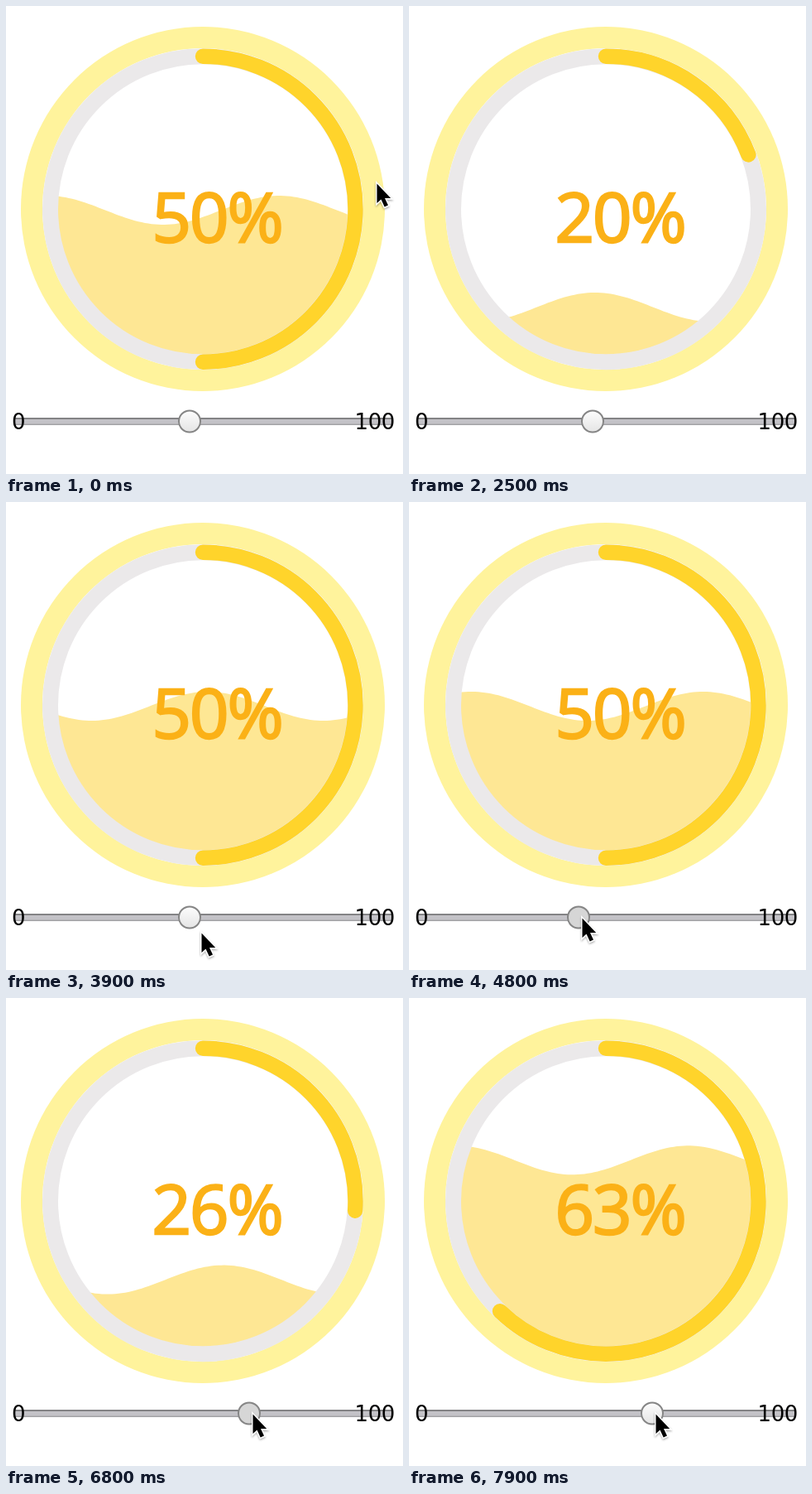
Recreate the animation shown at these times as an HTML page. Size 480 by 565 pixels, loop 8000 ms.

```html
<!DOCTYPE html>
<html lang="en">
<head>
<meta charset="utf-8">
<title>Liquid progress gauge</title>
<style>
  html, body { margin: 0; width: 100%; height: 100%; overflow: hidden; background: #fff; }
  svg { display: block; width: 480px; height: 565px; }
  .value {
    font: 83px "Open Sans", "Noto Sans", sans-serif; letter-spacing: -2px;
    fill: #fbb117; stroke: #fbb117; stroke-width: 2.4;
  }
  .label { font: 26px "DejaVu Sans", sans-serif; letter-spacing: -.4px; fill: #000; }
</style>
</head>
<body>
<svg viewBox="0 0 480 565">
  <defs>
    <clipPath id="bowl"><circle cx="238" cy="245" r="176"/></clipPath>
    <linearGradient id="shine" x2="0" y2="1">
      <stop offset="0" stop-color="#fdfdfd"/>
      <stop offset="1" stop-color="#e4e4e4"/>
    </linearGradient>
    <filter id="shadow" x="-50%" y="-50%" width="200%" height="200%">
      <feDropShadow dx="0" dy="1.5" stdDeviation="1.2" flood-opacity=".35"/>
    </filter>
  </defs>

  <circle cx="238" cy="245" r="220" fill="#fff39c"/>
  <circle cx="238" cy="245" r="194" fill="#fff"/>
  <path id="water" fill="#fee794" clip-path="url(#bowl)"/>
  <g fill="none">
    <circle cx="238" cy="245.2" r="184.5" stroke="#ebe9ea" stroke-width="19"/>
    <circle id="arc" cx="238" cy="245.2" r="184.5" stroke="#ffd42b" stroke-width="18.4"
            stroke-linecap="round" pathLength="100" transform="rotate(-90 238 245.2)"/>
  </g>
  <text id="value" class="value" x="176.5" y="284.6"></text>

  <rect x="9" y="497" width="459" height="9" rx="2" fill="#c3c2c7"/>
  <rect x="9" y="497" width="459" height="2" rx="1" fill="#838385"/>
  <rect x="9" y="504.5" width="459" height="1.5" rx=".7" fill="#a3a3a6"/>
  <circle id="knob" cy="501.5" r="13" stroke="#858585" stroke-width="2"/>
  <text class="label" x="7" y="511">0</text>
  <text class="label" x="470" y="511" text-anchor="end">100</text>

  <path id="cursor" d="M1.5 2.5V26L6.5 21.5L10.7 30.5L15 28.6L11 20H18.2Z" fill="#000"
        stroke="#fff" stroke-width="2.8" paint-order="stroke" filter="url(#shadow)"/>
</svg>
<script>
const LOOP = 8000, STEP = 100;
const RESET = 2000;           // the gauge restarts from empty
const RATE = .04;             // percent per ms
const WAVE = 280, AMP = 17.5;

const $ = id => document.getElementById(id);
const ramp = (t, from, to) => Math.min(1, Math.max(0, (t - from) / (to - from)));
const mix = (a, b, k) => a + (b - a) * k;
const between = (t, from, to) => t >= from && t < to;

// Change since `start`, at a constant rate, up to `amount`.
const run = (t, start, amount) => amount * ramp(t, start, start + Math.abs(amount) / RATE);

function percentAt(t) {
  if (t < RESET) return 50;
  return run(t, RESET, 50) + run(t, 5250, -24) + run(t, 6975, 37);
}

function crestAt(t) {
  return t < RESET ? 330 - .163 * Math.min(t, 1400) : 318 - .1865 * (t - RESET);
}

function knobAt(t) {
  return 222 - 85 * ramp(t, 4700, 5200) + 157 * ramp(t, 6200, 6700);
}

// The pointer sweeps in, rests below the knob, then holds on to it.
function pointerAt(t) {
  if (t < RESET) return [447, 212];
  const sweep = ramp(t, 2800, 3800), grab = ramp(t, 4300, 4600);
  return [
    mix(mix(457, 235, sweep), knobAt(t) + 3, grab),
    mix(mix(31, 518, sweep), 500, grab)
  ];
}

function waterPath(percent, crest) {
  const level = 246.5 - 3.9 * (percent - 50);
  let d = "M60 430";
  for (let x = 60; x <= 416; x += 4) {
    const y = level - AMP * Math.cos((x - crest) / WAVE * 2 * Math.PI);
    d += `L${x} ${y.toFixed(2)}`;
  }
  return d + "V430Z";
}

function draw(t) {
  const percent = Math.round(percentAt(t));
  const trail = t < RESET ? 50 : percentAt(Math.max(RESET, t - 20));
  const pressed = between(t, 4600, 5200) || between(t, 6100, 6950);
  const shown = t < 300 || t >= 2800;

  $("water").setAttribute("d", waterPath(percent, crestAt(t)));
  $("arc").setAttribute("stroke-dasharray", `${Math.max(trail, .01)} 200`);
  $("value").textContent = percent + "%";
  $("knob").setAttribute("cx", knobAt(t));
  $("knob").setAttribute("fill", pressed ? "#d6d6d6" : "url(#shine)");
  $("cursor").setAttribute("transform", `translate(${pointerAt(t)})`);
  $("cursor").setAttribute("visibility", shown ? "visible" : "hidden");
}

const start = performance.now();
function tick() {
  const t = (performance.now() - start) % LOOP;
  draw(Math.floor(t / STEP) * STEP);
  requestAnimationFrame(tick);
}
tick();
</script>
</body>
</html>
```
